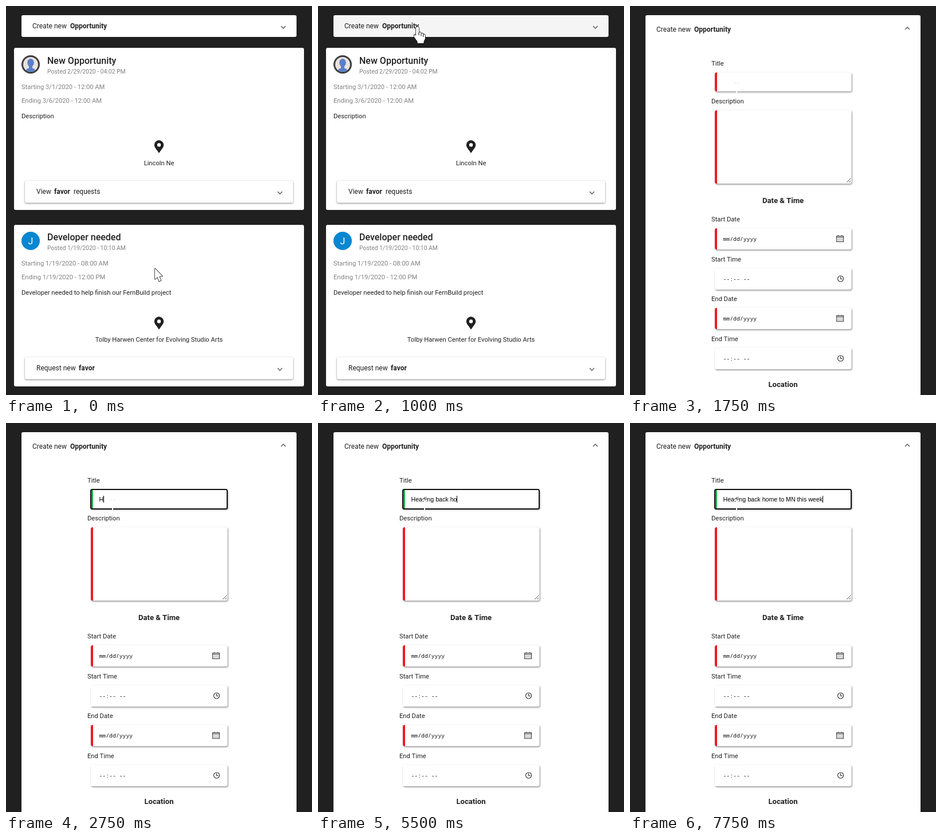
An HTML page with a canvas for the animation above (8 s loop, 534x679 px).

```html
<!DOCTYPE html>
<html lang="en">
<head>
<meta charset="utf-8">
<title>Opportunities</title>
<style>
html, body { margin: 0; width: 100%; height: 100%; overflow: hidden; background: #202020; }
canvas { display: block; }
</style>
</head>
<body>
<canvas id="stage" width="534" height="679"></canvas>
<script>
const ctx = document.getElementById('stage').getContext('2d');
const STEP = 250, LOOP = 8000;
const INK = '#212121', GREY = '#828282', RED = '#f21b1f', GREEN = '#27b04b';
const TITLE = 'Heading back home to MN this week';

// [start time, letters typed]
const TYPED = [[2750, 1], [3000, 3], [3250, 5], [3500, 8], [3750, 9], [4000, 11], [4250, 13],
  [5250, 14], [5500, 15], [5750, 17], [6000, 20], [6250, 21], [6500, 22], [6750, 24],
  [7000, 26], [7250, 29], [7500, 31], [7750, 33]];

// [start time, shape, x, y]
const POINTER = [[0, arrow, 260, 458], [250, arrow, 240, 330], [500, arrow, 194, 136],
  [750, hand, 173, 53], [1000, hand, 174, 37], [1250, arrow, 161, 88],
  [1500, arrow, 173, 106], [1750, beam, 186, 142]];

const at = (list, t) => list.filter(k => k[0] <= t).pop();

function text(str, x, y, { size = 11.2, weight = 400, color = INK, align = 'left', font = 'Roboto, sans-serif' } = {}) {
  ctx.font = `${weight} ${size}px ${font}`;
  ctx.fillStyle = color;
  ctx.textAlign = align;
  ctx.fillText(str, x, y);
  return ctx.measureText(str).width;
}

function box(x, y, w, h, fill, r = 3) {
  ctx.beginPath();
  ctx.roundRect(x, y, w, h, r);
  ctx.fillStyle = fill;
  ctx.fill();
}

function shadowBox(x, y, w, h, dx, dy, alpha) {
  ctx.save();
  ctx.shadowColor = `rgba(0,0,0,${alpha})`;
  ctx.shadowBlur = 3;
  ctx.shadowOffsetX = dx;
  ctx.shadowOffsetY = dy;
  box(x, y, w, h, '#fff');
  ctx.restore();
}

function disc(x, y, r, fill) {
  ctx.beginPath();
  ctx.arc(x, y, r, 0, Math.PI * 2);
  ctx.fillStyle = fill;
  ctx.fill();
}

function line(points, color = '#000', width = 1, closed = false) {
  ctx.beginPath();
  points.forEach(([x, y]) => ctx.lineTo(x, y));
  if (closed) ctx.closePath();
  ctx.strokeStyle = color;
  ctx.lineWidth = width;
  ctx.stroke();
}

function chevron(x, y, dir) {
  line([[x - 4, y - 2 * dir], [x, y + 2 * dir], [x + 4, y - 2 * dir]], '#6d6d6d', 1.7);
}

function pin(x, y) {
  ctx.beginPath();
  ctx.arc(x, y, 8.2, Math.PI * 0.87, Math.PI * 0.13);
  ctx.bezierCurveTo(x + 6, y + 6.5, x + 3, y + 9.5, x + 0.8, y + 13.2);
  ctx.quadraticCurveTo(x, y + 14.2, x - 0.8, y + 13.2);
  ctx.bezierCurveTo(x - 3, y + 9.5, x - 6, y + 6.5, x - 7.5, y + 3.3);
  ctx.fillStyle = '#202020';
  ctx.fill();
  disc(x, y, 3.2, '#fff');
}

function profile(x, y) {
  disc(x, y, 16, '#3c3c3c');
  disc(x, y, 13, '#e9e2df');
  ctx.save();
  ctx.beginPath();
  ctx.arc(x, y, 13, 0, Math.PI * 2);
  ctx.clip();
  ctx.fillStyle = '#5b80c9';
  ctx.beginPath();
  ctx.ellipse(x, y - 3, 5.8, 7, 0, 0, Math.PI * 2);
  ctx.ellipse(x, y + 13, 9.5, 7, 0, 0, Math.PI * 2);
  ctx.fill();
  ctx.fillRect(x - 3, y + 2, 6, 6);
  ctx.restore();
}

function outlined(points) {
  ctx.save();
  ctx.lineJoin = 'round';
  line(points, '#000', 1.4, true);
  ctx.fillStyle = '#fff';
  ctx.fill();
  ctx.restore();
}

function arrow() {
  outlined([[0, 0], [0, 19], [4.2, 15.2], [7.2, 22.5], [10.4, 21], [7.4, 14.2], [13, 13.7]]);
}

function hand() {
  outlined([[-3, 1], [-1.5, -1], [0.5, -1], [2, 1], [2, 9], [5, 9], [6.5, 10.5], [9, 10.7],
    [10, 12], [12, 12.7], [13, 14.5], [13, 20], [10.5, 25], [10.5, 28], [-0.5, 28], [-0.5, 25],
    [-6, 17.5], [-6.5, 14], [-4.5, 13], [-3, 15]]);
  [[2, 9], [6, 10.5], [9.7, 12]].forEach(([x, y]) => line([[x, y], [x, y + 5]]));
}

function beam() {
  ctx.fillStyle = '#e6e6e6';
  ctx.fillRect(-4, -8, 3, 1);
  ctx.fillRect(1, -8, 3, 1);
  ctx.fillStyle = '#fff';
  ctx.fillRect(-4, -7, 8, 1);
  ctx.fillRect(-1, -7, 2, 17);
}

function panelHead(y, dir) {
  text('Create new', 46, y + 4, { size: 12 });
  text('Opportunity', 112, y + 4, { size: 12, weight: 700 });
  chevron(484, dir > 0 ? y + 2 : y - 2, dir);
}

function card(y, h, c) {
  box(14, y, 506, h, '#fff');
  if (c.initial) {
    disc(43, y + 28, 16, '#0787d1');
    text(c.initial, 43, y + 34, { size: 16, color: '#fff', align: 'center' });
  } else {
    profile(43, y + 29);
  }
  const o = c.initial ? -1 : 0;
  text(c.title, 72, y + 28 + o, { size: 16, weight: 500 });
  text('Posted ' + c.posted, 72, y + 45 + o, { size: 10.4, color: GREY });
  text('Starting ' + c.start, 27, y + 72 + o, { color: GREY });
  text('Ending ' + c.end, 27, y + 96 + o, { color: GREY });
  text(c.about, 27, y + 123 + o);
  pin(267, y + 169.5 + o);
  text(c.place, 267, y + 205 + o, { align: 'center' });
  shadowBox(33, y + 232 + o, 468, 38.5, 0, 1, 0.5);
  c.action.forEach(([x, str, weight]) => text(str, x, y + 255 + o, { size: 12, weight }));
  chevron(478, y + 253 + o, 1);
}

function list(t) {
  box(27, 16, 480, 38, t >= 1000 ? '#f5f5f5' : '#fff');
  panelHead(35, 1);
  card(73, 283, {
    title: 'New Opportunity', posted: '2/29/2020 - 04:02 PM',
    start: '3/1/2020 - 12:00 AM', end: '3/6/2020 - 12:00 AM',
    about: 'Description', place: 'Lincoln Ne',
    action: [[53, 'View', 400], [84, 'favor', 700], [118, 'requests', 400]]
  });
  card(382, 282, {
    initial: 'J', title: 'Developer needed', posted: '1/19/2020 - 10:10 AM',
    start: '1/19/2020 - 08:00 AM', end: '1/19/2020 - 12:00 PM',
    about: 'Developer needed to help finish our FernBuild project',
    place: 'Tolby Harwen Center for Evolving Studio Arts',
    action: [[53, 'Request new', 400], [127, 'favor', 700]]
  });
}

function field(y, h, bar) {
  shadowBox(148, y, 238.5, h, 1, 1.5, 0.45);
  if (bar) box(148, y, 4, h, bar, [3, 0, 0, 3]);
}

function calendar(x, y) {
  ctx.strokeStyle = '#333';
  ctx.lineWidth = 1;
  ctx.strokeRect(x + 0.5, y + 1.5, 12, 10);
  ctx.fillStyle = '#333';
  ctx.fillRect(x, y + 3, 13, 1);
  ctx.fillRect(x + 3, y, 1, 2);
  ctx.fillRect(x + 9, y, 1, 2);
  ctx.fillStyle = '#777';
  for (let i = 0; i < 12; i++) ctx.fillRect(x + 2 + (i % 4) * 2.6, y + 5 + Math.floor(i / 4) * 2, 1.5, 1);
}

function clock(x, y) {
  ctx.beginPath();
  ctx.arc(x, y, 5, 0, Math.PI * 2);
  ctx.strokeStyle = '#222';
  ctx.lineWidth = 1.1;
  ctx.stroke();
  line([[x, y - 3.5], [x, y + 0.5], [x + 3, y + 0.5]], '#222', 1);
}

const mono = (str, y) => text(str, 162.5, y, { size: 9.78, color: '#111', font: '"Noto Sans Mono", monospace' });

function dateField(y) {
  field(y, 37, RED);
  mono('mm/dd/yyyy', y + 22);
  calendar(360, y + 12);
}

function timeField(y, bottom) {
  field(y, bottom - y, null);
  mono('--:-- --', y + 22);
  clock(367.5, y + 18);
}

function titleField(t) {
  const count = (at(TYPED, t) || [0, 0])[1];
  const focused = t >= 2000;
  field(116, focused ? 34 : 33, count ? GREEN : RED);
  if (!focused) return;
  ctx.beginPath();
  ctx.roundRect(148, 116, 238, 34, 2.5);
  ctx.strokeStyle = '#101010';
  ctx.lineWidth = 2;
  ctx.stroke();
  const w = text(TITLE.slice(0, count), 162.5, 137, {
    size: 10.667, color: '#000', font: '"Liberation Sans", Arial, sans-serif'
  });
  const blink = t === 2500 || t === 5000;
  if (!blink) {
    ctx.fillStyle = '#000';
    ctx.fillRect(Math.round(162.5 + w), 127, 1, 12);
  }
}

function form(t) {
  const d = t < 1500 ? -1 : 0;
  const heading = { size: 13.1, weight: 700, align: 'center' };
  box(27, 16, 480, 670, '#fff');
  panelHead(41, -1);
  text('Title', 142, 104);
  titleField(t);
  text('Description', 142, 170 + d);
  field(182 + d, 128, RED);
  line([[378, 308 + d], [385, 301 + d]], '#555');
  line([[382, 308 + d], [385, 305 + d]], '#555');
  text('Date & Time', 267, 344, heading);
  text('Start Date', 142, 376);
  dateField(388);
  text('Start Time', 142, 446 + d);
  timeField(458 + d, 495);
  text('End Date', 142, 515);
  dateField(527);
  text('End Time', 142, 585 + d);
  timeField(597 + d, 634);
  text('Location', 267, 665 + d, heading);
}

function draw(now) {
  const t = Math.floor(now % LOOP / STEP) * STEP;
  ctx.fillStyle = '#202020';
  ctx.fillRect(0, 0, 534, 679);
  (t < 1250 ? list : form)(t);
  const [, shape, x, y] = at(POINTER, t);
  ctx.save();
  ctx.translate(x, y);
  shape();
  ctx.restore();
}

let begin;
function tick(now) {
  begin ??= now;
  draw(now - begin);
  requestAnimationFrame(tick);
}
draw(0);
requestAnimationFrame(tick);
</script>
</body>
</html>
```
